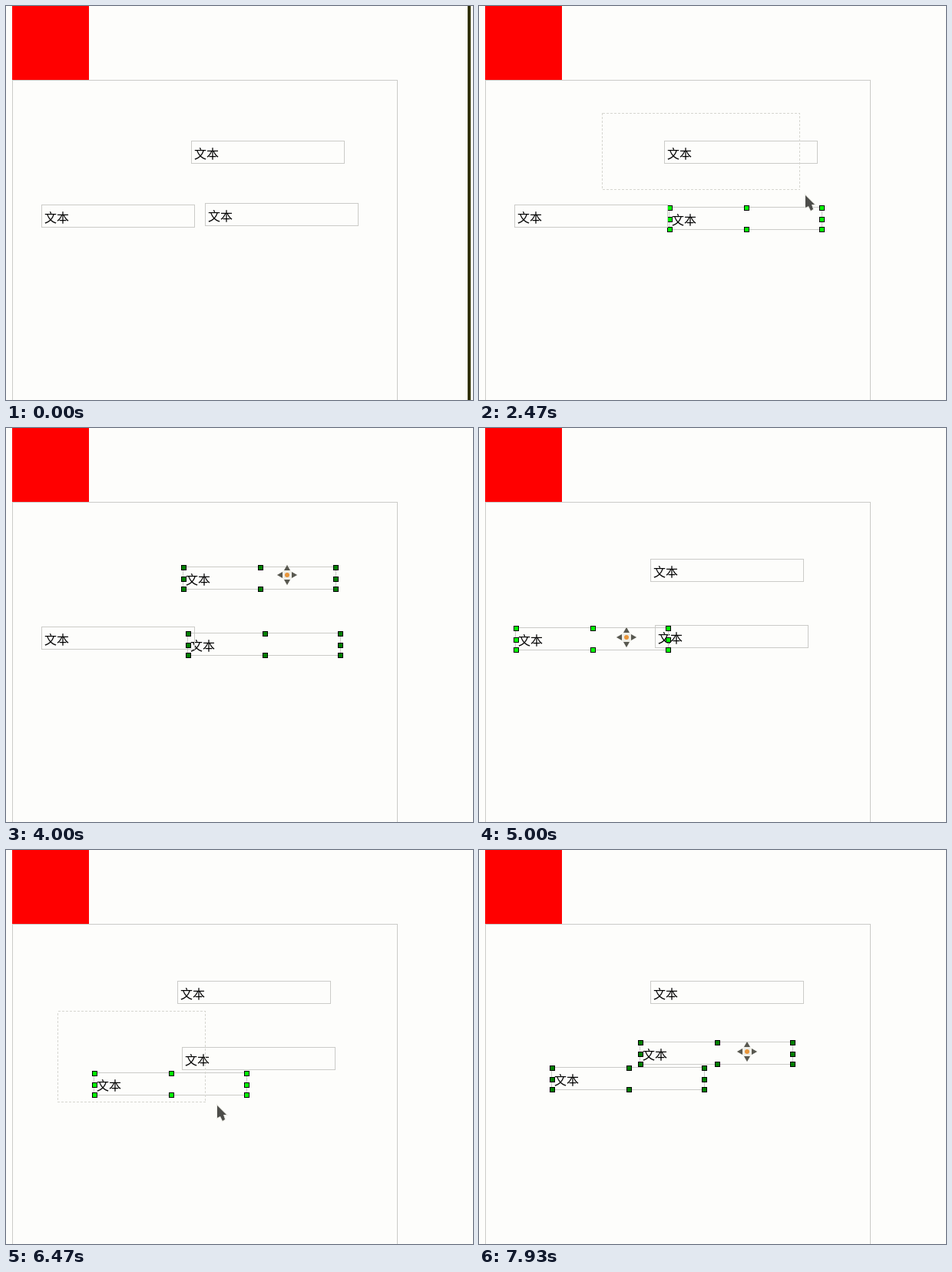
Recreate the animation shown at these times as an HTML page. Size 608 px wide and 512 px high, loop 8000 ms.

```html
<!DOCTYPE html>
<html lang="zh">
<head>
<meta charset="utf-8">
<title>Canvas editor</title>
<style>
  html, body { margin: 0; width: 100%; height: 100%; overflow: hidden; background: #fdfdfb; }
  svg { display: block; width: 608px; height: 512px; }
  .line { fill: none; stroke: #cbcbc8; shape-rendering: crispEdges; }
  #band { stroke: #d6d6d0; stroke-dasharray: 3 2; }
  text { font: 16px "Noto Sans CJK SC", "Noto Sans CJK", "Noto Sans CJK JP", sans-serif; fill: #000; }
  .handle { display: none; stroke: #000; shape-rendering: crispEdges; }
  .single .handle { display: inline; fill: #0f0; }
  .multi .handle { display: inline; fill: #008000; }
</style>
</head>
<body>
<svg viewBox="0 0 608 512">
  <rect width="608" height="512" fill="#fdfdfb"/>
  <rect x="8" width="100" height="96" fill="#f00"/>
  <rect class="line" x="8.5" y="96.5" width="501" height="500"/>
  <rect id="edge" x="601" width="4" height="512" fill="#323200"/>
  <g id="boxes"></g>
  <rect id="band" class="line"/>
  <g id="cursor">
    <path id="arrow" d="M0 0V16L4 14 7 20 10 18 8 12H12Z" fill="#4d4d4a" stroke="#ecece6" stroke-width="2" paint-order="stroke"/>
    <g id="move">
      <path d="M0-14 5-5 14 0 5 5 0 14-5 5-14 0-5-5Z" fill="#eeeee8"/>
      <path d="M0-13 4-6H-4ZM13 0 6 4V-4ZM0 13-4 6H4ZM-13 0-6-4V4Z" fill="#585850"/>
      <circle r="3" fill="#e8953a"/>
    </g>
  </g>
</svg>
<script>
const LOOP = 8000, TICK = 200 / 3, W = 200, H = 30, DOWN = true;
const $ = id => document.getElementById(id);

// Pointer: tick, x, y, button held from here on
const path = [
  [0, 640, 220], [13, 340, 266],
  [16, 340, 266, DOWN], [17, 330, 268, DOWN], [22, 328, 271],
  [28, 128, 158],
  [30, 160, 139, DOWN], [36, 418, 239, DOWN], [44, 474, 291],
  [54, 377, 186, DOWN], [60, 366, 191, DOWN], [64, 303, 181, DOWN], [68, 359, 181],
  [73, 191, 271, DOWN], [75, 192, 272, DOWN], [80, 259, 302],
  [87, 67, 209, DOWN], [96, 260, 328, DOWN], [97, 275, 332, DOWN], [104, 438, 344],
  [108, 369, 269, DOWN], [112, 398, 299, DOWN], [119, 349, 262], [120, 349, 262]
].map(([at, x, y, down]) => ({ at, x, y, down }));

// Pair each press with the release that follows it
const strokes = path
  .filter((p, i) => p.down && !path[i - 1].down)
  .map(p => ({ press: p, release: path.find(q => q.at > p.at && !q.down) }));

const corners = [[241, 175], [259, 256], [46, 258]];

function pointer(k) {
  const i = Math.max(1, path.findIndex(p => p.at >= k));
  const a = path[i - 1], b = path[i], f = (k - a.at) / (b.at - a.at);
  return { x: Math.round(a.x + (b.x - a.x) * f), y: Math.round(a.y + (b.y - a.y) * f) };
}

const hit = (b, p) => p.x >= b.x && p.x < b.x + W && p.y >= b.y && p.y < b.y + H;
const inside = (b, p, q) => b.x >= p.x && b.y >= p.y && b.x + W <= q.x && b.y + H <= q.y;

// Replay every press, drag and rubber band up to tick k
function replay(k) {
  const boxes = corners.map(([x, y]) => ({ x, y, picked: false }));
  let band = null;
  for (const { press, release } of strokes) {
    if (press.at > k) break;
    const target = boxes.find(b => hit(b, press));
    if (target) {
      if (!target.picked) boxes.forEach(b => b.picked = b === target);
      const p = pointer(Math.min(k, release.at));
      for (const b of boxes.filter(b => b.picked)) {
        b.x += p.x - press.x;
        b.y += p.y - press.y;
      }
    } else if (k >= release.at) {
      boxes.forEach(b => b.picked = inside(b, press, release));
    } else if (k > press.at) {
      band = { from: press, to: pointer(k - 1) }; // trails the pointer by a tick
    }
  }
  return { boxes, band };
}

function make(tag, attrs, parent) {
  const el = document.createElementNS("http://www.w3.org/2000/svg", tag);
  for (const a in attrs) el.setAttribute(a, attrs[a]);
  return parent.appendChild(el);
}

const groups = corners.map(() => {
  const g = make("g", {}, $("boxes"));
  make("rect", { class: "line", x: .5, y: .5, width: W - 1, height: H - 1 }, g);
  make("text", { x: 4, y: 23 }, g).textContent = "文本";
  for (const x of [1, 101, 199])
    for (const y of [1, 16, 29])
      if (x !== 101 || y !== 16)
        make("rect", { class: "handle", x: x - 2.5, y: y - 2.5, width: 6, height: 6 }, g);
  return g;
});

const show = (el, on) => el.style.display = on ? "" : "none";
const shift = (el, { x, y }) => el.setAttribute("transform", `translate(${x} ${y})`);

function draw(now) {
  const k = Math.floor((now % LOOP + 4) / TICK) % 120;
  const p = pointer(k);
  const { boxes, band } = replay(k);
  const look = boxes.filter(b => b.picked).length > 1 ? "multi" : "single";
  boxes.forEach((b, i) => {
    shift(groups[i], b);
    groups[i].setAttribute("class", b.picked ? look : "");
  });

  show($("band"), band);
  if (band) {
    const { from, to } = band, el = $("band");
    el.setAttribute("x", from.x + .5);
    el.setAttribute("y", from.y + .5);
    el.setAttribute("width", Math.max(0, to.x - from.x - 1));
    el.setAttribute("height", Math.max(0, to.y - from.y - 1));
  }

  const moving = !band && boxes.some(b => hit(b, p));
  show($("edge"), k < 2);
  show($("cursor"), k >= 2);
  show($("move"), moving);
  show($("arrow"), !moving);
  shift($("cursor"), p);
}

const start = performance.now();
function loop() {
  draw(performance.now() - start);
  requestAnimationFrame(loop);
}
loop();
</script>
</body>
</html>
```
